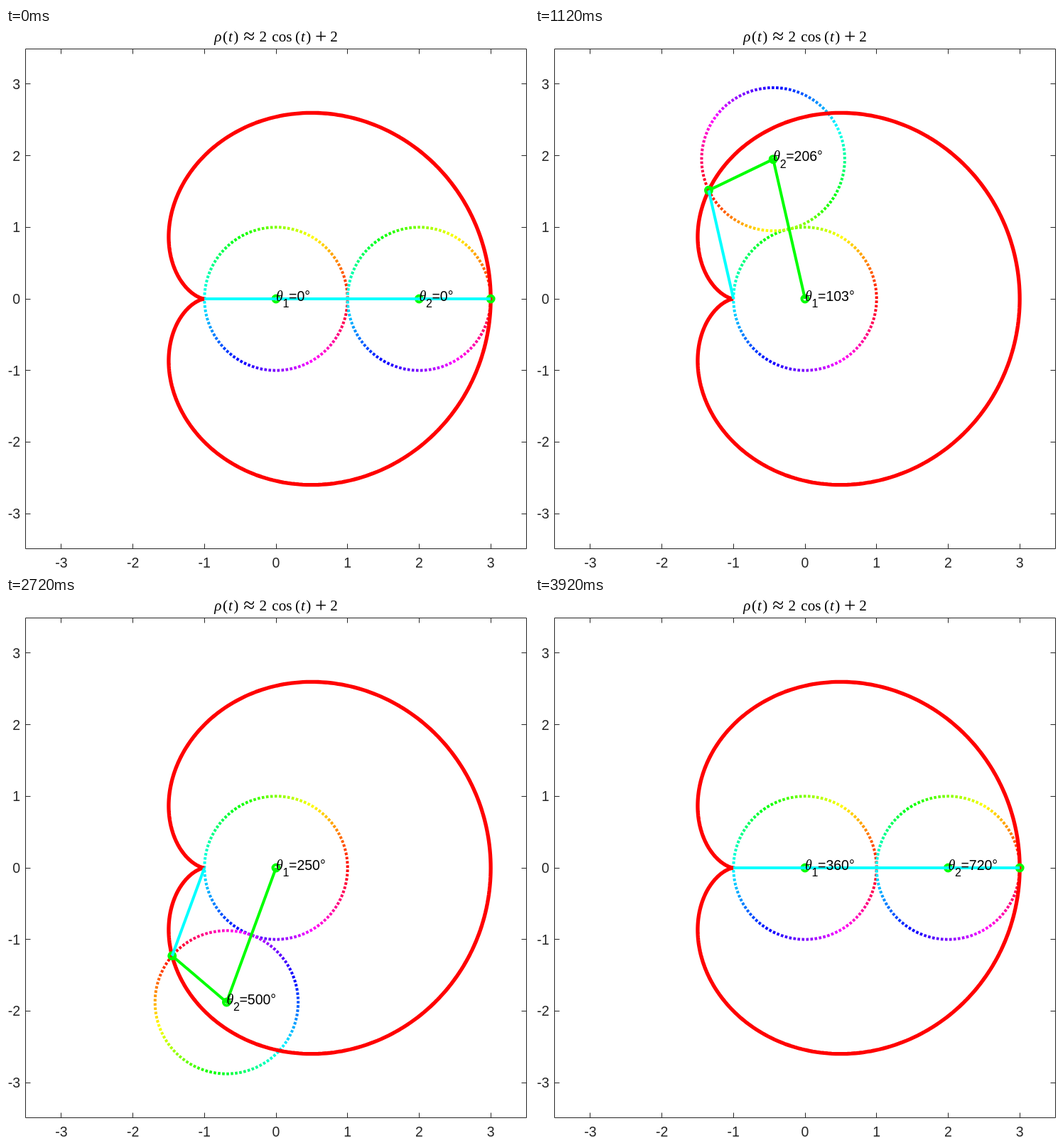
Recreate the animation shown at these times as an HTML page. Size 736x761 px, loop 4 s.

```html
<!DOCTYPE html>
<html lang="en">
<head>
<meta charset="utf-8">
<title>Cardioid</title>
<style>
  html, body { margin: 0; width: 100%; height: 100%; overflow: hidden; background: #fff; }
  svg { display: block; }
  text { font: 19.5px "Liberation Sans", Arial, sans-serif; fill: #262626; }
  #title text { font: 21.2px "Liberation Serif", Times, serif; fill: #000; }
  #title .it { font-style: italic; }
  #title .op { font-size: 29px; }
  .label text { fill: #000; }
  .label .sub { font-size: 16px; }
  .label .theta { font: italic 20px "Liberation Serif", Times, serif; }
  #axes { fill: none; stroke: #262626; }
  #curve { fill: none; stroke: #f00; stroke-width: 5.33; stroke-linejoin: round; }
  .dots { fill: none; stroke-width: 4; }
  .arm { fill: none; stroke: #0f0; stroke-width: 4; stroke-linejoin: round; }
  #chord { stroke: #0ff; stroke-width: 4; }
</style>
</head>
<body>
<svg width="736" height="761" viewBox="0 0 736 761">
  <path id="axes"/>
  <g id="ticks"></g>
  <g id="title"></g>
  <g id="fixed" class="dots"></g>
  <g id="rolling" class="dots"></g>
  <path id="curve"/>
  <path id="arm" class="arm"/>
  <g id="joints"></g>
  <line id="chord"/>
  <g id="label1" class="label"></g>
  <g id="label2" class="label"></g>
</svg>
<script>
const UNIT = 100.71, CX = 380, CY = 381;
const STEPS = 50, STEP_MS = 80, TAU = 2 * Math.PI;

const $ = id => document.getElementById(id);
const px = ([x, y]) => [CX + UNIT * x, CY - UNIT * y];
const polar = (r, a) => [r * Math.cos(a), r * Math.sin(a)];
const add = (p, q) => [p[0] + q[0], p[1] + q[1]];
const line = points => 'M' + points.map(p => px(p).map(v => v.toFixed(2))).join('L');

function make(parent, tag, attrs, text = '') {
  const el = document.createElementNS('http://www.w3.org/2000/svg', tag);
  for (const key in attrs) el.setAttribute(key, attrs[key]);
  el.textContent = text;
  parent.append(el);
  return el;
}

// Formula set with TeX spacing; offsets in em
function drawTitle() {
  const em = 21.2, left = 293.2, baseline = 19;
  const put = (offset, text, cls = '') => make($('title'), 'text', {
    class: cls, x: left + offset * em, y: baseline + (cls === 'op' ? 2 : 0)
  }, text);
  const argument = offset => {
    put(offset + 0.04, '(');
    put(offset + 0.42, 't', 'it');
    put(offset + 0.76, ')');
  };
  put(0, 'ρ', 'it');
  argument(0.517);
  put(1.934, '≈', 'op');
  put(2.99, '2');
  put(3.823, 'cos');
  argument(5.328);
  put(6.689, '+', 'op');
  put(7.689, '2');
}

function drawAxes() {
  const [l, t, r, b] = [27.5, 29.5, 732.5, 732.5];
  let d = `M${l} ${t}H${r}V${b}H${l}Z`;
  for (let n = -3; n <= 3; n++) {
    const [tx, ty] = px([n, n]);
    const [x, y] = [tx, ty].map(v => Math.floor(v) + 0.5);
    d += `M${x} ${t}v7M${x} ${b}v-7M${l} ${y}h7M${r} ${y}h-7`;
    make($('ticks'), 'text', { x: tx, y: 758.5, 'text-anchor': 'middle' }, n);
    make($('ticks'), 'text', { x: 20, y: ty + 7, 'text-anchor': 'end' }, n);
  }
  $('axes').setAttribute('d', d);
}

// Unit circle of short dashes, hue following the angle
function drawDots(group) {
  const count = 105, dash = 3.6 / UNIT;
  for (let i = 0; i < count; i++) {
    const a = i / count * TAU;
    const [x1, y1] = polar(UNIT, a), [x2, y2] = polar(UNIT, a + dash);
    make(group, 'path', {
      d: `M${x1} ${-y1}L${x2} ${-y2}`,
      stroke: `hsl(${(a + dash / 2) / TAU * 360} 100% 50%)`
    });
  }
}

function makeLabel(group, index) {
  make(group, 'text', { class: 'theta', y: 2.5 }, 'θ');
  make(group, 'text', { class: 'sub', x: 9.5, y: 12 }, index);
  return make(group, 'text', { x: 18, y: 2.5 });
}

const moveTo = (el, p, turn = 0) =>
  el.setAttribute('transform', `translate(${px(p)}) rotate(${-turn})`);

const centreAt = a => polar(2, a);
const tipAt = a => add(centreAt(a), polar(1, 2 * a));

drawTitle();
drawAxes();
drawDots($('fixed'));
drawDots($('rolling'));
moveTo($('fixed'), [0, 0]);
$('curve').setAttribute('d',
  line(Array.from({ length: 401 }, (_, i) => tipAt(-Math.PI + i / 400 * TAU))));

const joints = [0, 1, 2].map(() => make($('joints'), 'circle', { class: 'arm', r: 4.5 }));
const value1 = makeLabel($('label1'), 1);
const value2 = makeLabel($('label2'), 2);
moveTo($('label1'), [0, 0]);

function draw(step) {
  const deg = step * 360 / (STEPS - 1), a = deg * Math.PI / 180;
  const centre = centreAt(a), tip = tipAt(a), arm = [[0, 0], centre, tip];
  moveTo($('rolling'), centre, 2 * deg);
  $('arm').setAttribute('d', line(arm));
  joints.forEach((el, i) => moveTo(el, arm[i]));
  const [x1, y1] = px([-1, 0]), [x2, y2] = px(tip);
  Object.entries({ x1, y1, x2, y2 }).forEach(([k, v]) => $('chord').setAttribute(k, v));
  moveTo($('label2'), centre);
  value1.textContent = `=${Math.round(deg)}°`;
  value2.textContent = `=${Math.round(2 * deg)}°`;
}

const start = performance.now();
function tick() {
  draw(Math.floor((performance.now() - start) / STEP_MS) % STEPS);
  requestAnimationFrame(tick);
}
tick();
</script>
</body>
</html>
```
